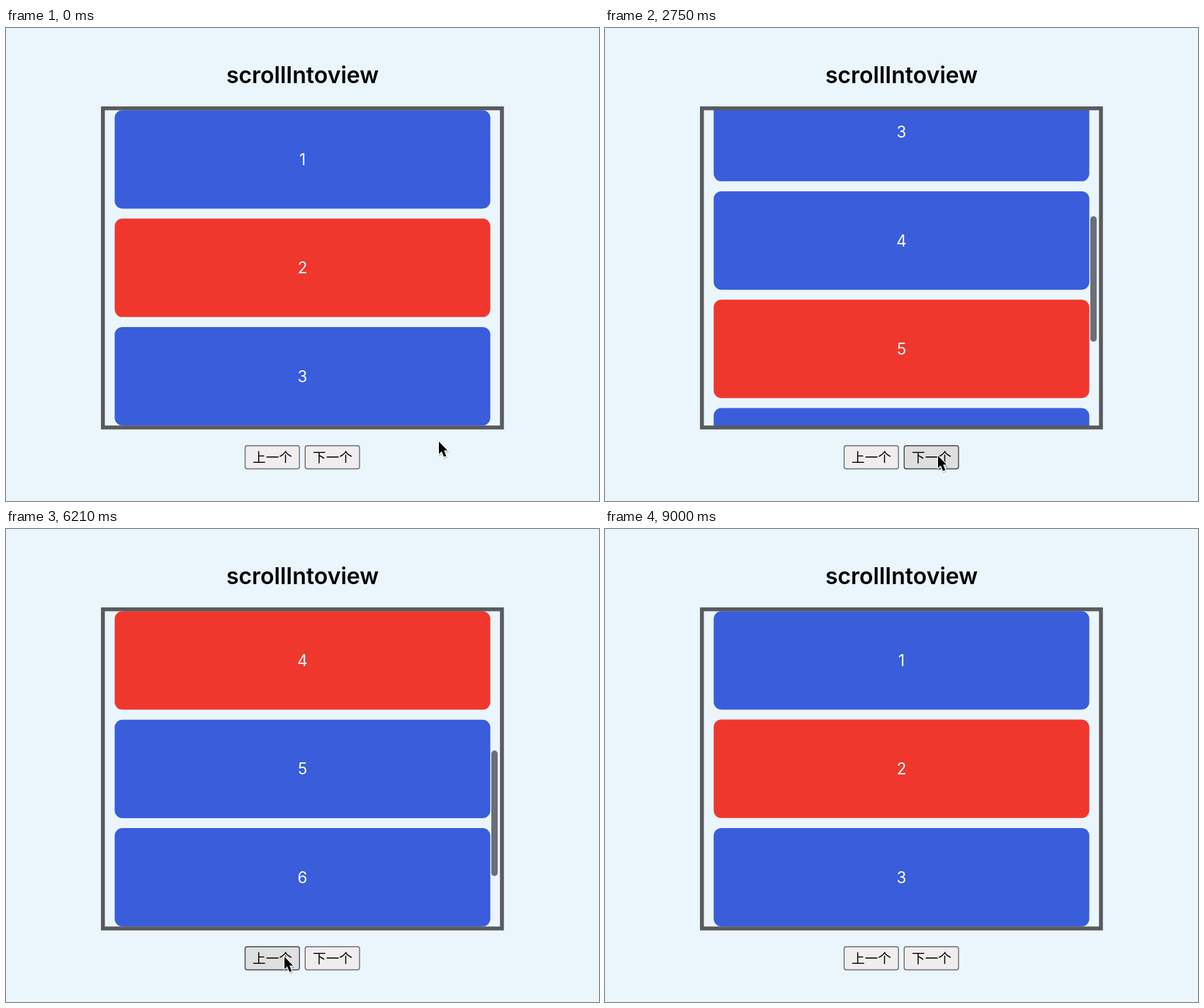
An HTML page for the animation above (9.12 s loop, 837 by 669 pixels).

```html
<!DOCTYPE html>
<html lang="zh-CN">
<head>
<meta charset="utf-8">
<title>scrollIntoview</title>
<style>
html, body { margin: 0; width: 100%; height: 100%; overflow: hidden; background: #eaf5fc; }
#stage { display: block; width: 837px; height: 669px; }
text { text-anchor: middle; }
.title { font: 600 32px Inter, "Liberation Sans", sans-serif; }
.frame { fill: none; stroke: #595a5c; stroke-width: 5.5px; }
.card rect { fill: #395ddb; }
.card.on rect { fill: #f0372e; }
.card text { font: 22.3px Inter, "Liberation Sans", sans-serif; fill: #fff; }
.btn rect { fill: #efeded; stroke: #6f6f70; stroke-width: 1.4px; }
.btn text { font: 18.6px "Noto Sans CJK SC", "Noto Sans CJK", sans-serif; }
.btn.hover rect { fill: #e0dfdf; stroke: #4a4a4a; }
.btn.down rect { fill: #f5f4f5; stroke: #8d8d8d; }
#ring { fill: none; stroke: #000; stroke-width: 2px; }
#thumb { fill: #6a6f78; }
</style>
</head>
<body>
<svg id="stage" viewBox="0 0 837 669">
  <text class="title" x="418.5" y="77.5">scrollIntoview</text>
  <svg x="139" y="116" width="559" height="447" overflow="hidden"><g id="list"></g></svg>
  <rect class="frame" x="136.8" y="113.6" width="563.2" height="451.4"/>
  <rect id="thumb" x="685" y="124" width="9" height="177.5" rx="4.5"/>
  <g class="btn" id="prev">
    <rect x="337.5" y="590.7" width="76.7" height="32.8" rx="3"/>
    <text x="376" y="614.4">上一个</text>
  </g>
  <g class="btn" id="next">
    <rect x="422.3" y="590.7" width="76.7" height="32.8" rx="3"/>
    <text x="461" y="614.4">下一个</text>
  </g>
  <g id="pointer">
    <circle id="ring" cx="-1" cy="2" r="30"/>
    <g transform="scale(.94)" stroke-linejoin="round">
      <path d="M1 3V21L5 17L8.5 25L12 23.5L8.5 16H14Z" opacity=".16" stroke="#000" stroke-width="2"/>
      <path d="M0 0V18.5L4.2 14.6L7.6 23L11 21.6L7.6 13.4H13Z" stroke="#fff" stroke-width="2.4" paint-order="stroke"/>
    </g>
  </g>
</svg>
<script>
const LOOP = 9120, PITCH = 153.35, MAX = 627, COUNT = 7;
const $ = id => document.getElementById(id);

// press time, release time, card selected on release
const clicks = [
  [1310, 1400, 3], [1960, 2045, 4], [2520, 2610, 5], [3085, 3171, 6], [4000, 4095, 7],
  [4840, 4922, 6], [5380, 5490, 5], [6110, 6204, 4], [6650, 6740, 3], [7500, 7578, 2]
];

// start, end, from x, from y, to x, to y
const moves = [
  [40, 950, 611, 585, 470, 605],
  [4270, 4760, 470, 605, 393, 605],
  [8030, 8400, 393, 605, 396, 598]
];

function add(parent, tag, attrs) {
  const el = document.createElementNS('http://www.w3.org/2000/svg', tag);
  for (const name in attrs) el.setAttribute(name, attrs[name]);
  return parent.appendChild(el);
}

const cards = Array.from({ length: COUNT }, (_, i) => {
  const y = i * PITCH + 0.2;
  const card = add($('list'), 'g', { class: 'card' });
  add(card, 'rect', { x: 14.4, y, width: 530.2, height: 139.3, rx: 11 });
  add(card, 'text', { x: 279.5, y: y + 77.8 }).textContent = i + 1;
  return card;
});

const clamp = (v, lo, hi) => Math.min(hi, Math.max(lo, v));
const ease = p => { p = clamp(p, 0, 1); return p * p * (3 - 2 * p); };
const centred = n => clamp((n - 2) * PITCH, 0, MAX);

function scrollState(t) {
  let chosen = 2, top = 0;
  for (const [, up, n] of clicks) {
    if (t < up) break;
    const delta = centred(n) - top;
    const span = Math.abs(delta) < 20 ? 150 : 430;
    top += delta * ease((t - up) / span);
    chosen = n;
  }
  return { chosen, top };
}

function pointerAt(t) {
  let x = 611, y = 585;
  for (const [a, b, x0, y0, x1, y1] of moves) {
    if (t < a) break;
    const p = ease((t - a) / (b - a));
    x = x0 + (x1 - x0) * p;
    y = y0 + (y1 - y0) * p;
  }
  return { x, y };
}

function paintButton(id, left, pos, pressed, visible) {
  const over = visible && pos.x >= left && pos.x <= left + 78 && pos.y >= 590 && pos.y <= 624;
  $(id).setAttribute('class', 'btn' + (over ? (pressed ? ' down' : ' hover') : ''));
}

function draw(t) {
  const { chosen, top } = scrollState(t);
  cards.forEach((card, i) => card.classList.toggle('on', i + 1 === chosen));
  $('list').setAttribute('transform', `translate(0 ${-top})`);
  $('thumb').setAttribute('transform', `translate(0 ${top * 0.4117})`);
  $('thumb').style.opacity = t < clicks[0][1] ? 0 : 1 - clamp((t - 8580) / 380, 0, 1);

  const pos = pointerAt(t), visible = t < 9000;
  const pressed = clicks.some(([down, up]) => t >= down && t < up);
  $('pointer').setAttribute('transform', `translate(${pos.x} ${pos.y})`);
  $('pointer').style.display = visible ? '' : 'none';
  $('ring').style.display = pressed ? '' : 'none';
  paintButton('prev', 337, pos, pressed, visible);
  paintButton('next', 422, pos, pressed, visible);
}

const start = performance.now();
function tick() {
  draw((performance.now() - start) % LOOP);
  requestAnimationFrame(tick);
}
tick();
</script>
</body>
</html>
```
